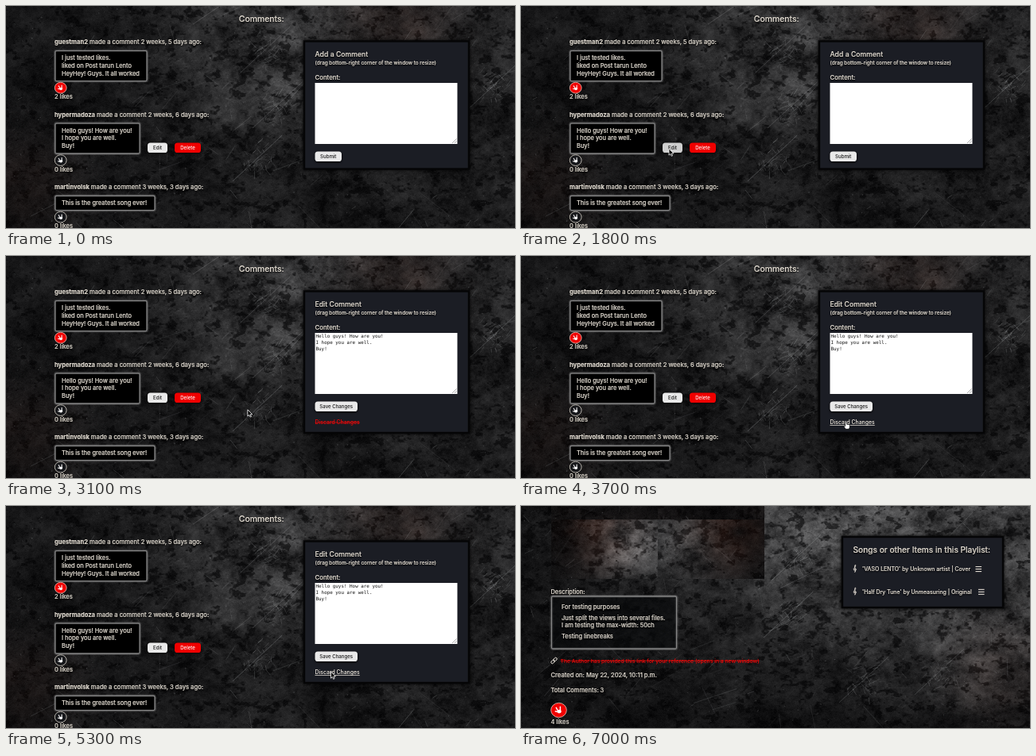
These frames come from a looping animation (640 by 280 pixels, 7.1 s). An HTML page with a canvas:

```html
<!DOCTYPE html>
<html lang="en">
<head>
<meta charset="utf-8">
<title>Comments</title>
<style>
  html, body { margin: 0; width: 100%; height: 100%; overflow: hidden; background: #16171a; }
  canvas, svg { position: absolute; left: 0; top: 0; width: 640px; height: 280px; display: block; }
  text { font-family: Inter, "Open Sans", sans-serif; font-weight: 500; fill: #f8f1e6; white-space: pre; }
  .body { stroke: #f8f1e6; stroke-width: .18px; text-shadow: 0 1px 1.5px #000; }
  .link { fill: #f00808; text-decoration: line-through .6px; }
  .link.hover { fill: #f8f1e6; text-decoration: underline .6px; }
  .mono { font-family: "DejaVu Sans Mono", monospace; font-weight: 400; fill: #111; }
  .panel { fill: #1b1d24; stroke: #050506; stroke-width: 2.4; filter: drop-shadow(0 0 2px #000); }
  .btn { filter: drop-shadow(0 1px 1.5px #000); }
  .line { fill: none; stroke: #f8f1e6; }
</style>
</head>
<body>
<canvas id="wallA" width="640" height="280"></canvas>
<canvas id="wallB" width="640" height="280"></canvas>
<svg id="stage" viewBox="0 0 640 280" xmlns="http://www.w3.org/2000/svg"></svg>
<script>
const LOOP = 7100, STEP = 100, W = 640, H = 280;
const $ = id => document.getElementById(id);

// ---------- scratched metal ----------
function random(seed) {
  return () => {
    seed = (seed + 0x6D2B79F5) | 0;
    let n = Math.imul(seed ^ seed >>> 15, 1 | seed);
    n = n + Math.imul(n ^ n >>> 7, 61 | n) ^ n;
    return ((n ^ n >>> 14) >>> 0) / 4294967296;
  };
}

function cloudNoise(seed) {
  const grid = Float32Array.from({ length: 4096 }, random(seed));
  const at = (x, y) => grid[(x & 63) + (y & 63) * 64];
  const noise = (x, y) => {
    const ix = Math.floor(x), iy = Math.floor(y);
    let u = x - ix, v = y - iy;
    u *= u * (3 - 2 * u);
    v *= v * (3 - 2 * v);
    const a = at(ix, iy), b = at(ix + 1, iy), c = at(ix, iy + 1), d = at(ix + 1, iy + 1);
    return a + (b - a) * u + (c - a + (a - b - c + d) * u) * v;
  };
  return (x, y) => noise(x, y) * .48 + noise(x * 2.1 + 7, y * 2.1) * .3 + noise(x * 4.3, y * 4.3 + 5) * .22;
}

// light(x, y) gives the brightness, rust(x, y) the warm tint, patches are worn spots
function metal(g, [x0, y0, w, h], seed, light, rust, patches = []) {
  const img = g.createImageData(w, h), px = img.data, fbm = cloudNoise(seed), rnd = random(seed + 9);
  for (let i = 0; i < w * h; i++) {
    const x = x0 + i % w, y = y0 + Math.floor(i / w);
    const cloud = fbm(x / 44, y / 34), grain = fbm(x / 5 + 20, y / 4);
    const pit = Math.max(0, fbm(x / 11 + 31, y / 8 + 17) - .56 + (grain - .5) * .3);
    const v = light(x, y) * (.2 + cloud * 1.1 + (grain - .5) * .65) * Math.max(.4, 1 - pit * 4) + (rnd() - .5) * 7;
    const warm = rust(x, y) * cloud;
    px.set([v + warm, v + warm * .25, v + 1, 255], i * 4);
  }
  g.putImageData(img, x0, y0);

  g.save();
  g.beginPath();
  g.rect(x0, y0, w, h);
  g.clip();
  const scratch = (x, y, len, turn, alpha) => {
    g.strokeStyle = `rgba(205,208,210,${alpha})`;
    g.lineWidth = .4 + rnd() * .4;
    g.beginPath();
    g.moveTo(x, y);
    g.lineTo(x + Math.cos(turn) * len, y + Math.sin(turn) * len);
    g.stroke();
  };
  const slant = () => rnd() < .6 ? -1 + rnd() * .7 : .5 + rnd() * 1.1;
  for (let i = 0; i < w * h / 900; i++)
    scratch(x0 + rnd() * w, y0 + rnd() * h, 3 + rnd() ** 4 * 60, slant(), .06 + rnd() * .2);
  for (const [x, y] of patches) {
    scratch(x - 30, y + 26, 85, -.75, .3);
    for (let i = 0; i < 60; i++)
      scratch(x + (rnd() + rnd() - 1) * 24, y + (rnd() + rnd() - 1) * 24, 2 + rnd() * 9, slant(), .1 + rnd() * .2);
  }
  for (let i = 0; i < w * h / 400; i++) {
    g.fillStyle = `rgba(190,192,194,${.05 + rnd() * .22})`;
    g.fillRect(x0 + rnd() * w, y0 + rnd() * h, .5 + rnd(), .5 + rnd());
  }
  g.restore();
}

const glow = (x, y, cx, cy, r) => Math.exp(-((x - cx) ** 2 + (y - cy) ** 2) / r ** 2);
const stage = [0, 0, W, H];

metal($("wallA").getContext("2d"), stage, 41,
  (x, y) => 26 + 38 * glow(x, y, 335, 50, 115) + 24 * x / W * (1 - y / H * .4),
  (x, y) => 16 * glow(x, y, 490, 20, 60) + 10 * glow(x, y, 20, 230, 60),
  [[325, 58], [340, 128], [610, 105], [315, 195]]);

const wallB = $("wallB").getContext("2d");
metal(wallB, stage, 77,
  (x, y) => 24 + 75 * (x / W) ** .6 * (1 - y / H) + 28 * glow(x, y, 370, 30, 90) + 20 * glow(x, y, 560, 190, 110),
  (x, y) => 10 * glow(x, y, 600, 210, 60),
  [[335, 140], [345, 68], [525, 212], [430, 222]]);
for (const [i, x] of [38, 172].entries()) {
  metal(wallB, [x, 0, 134, 17], 5 + i, () => 24, () => 4);
  metal(wallB, [x, 17, 134, 75], 15 + i,
    (px, py) => 24 + (85 - i * 20) * glow(px, py, 140 + i * 62, 46, 50),
    (px, py) => 30 * glow(px, py, 95 + i * 165, 28, 45));
}

// ---------- drawing helpers ----------
const text = (x, y, s, size = 7.45, more = "") => `<text class="body" x="${x}" y="${y}" font-size="${size}" ${more}>${s}</text>`;
const link = (x, y, s, size, id) => `<text id="${id}" class="link" x="${x}" y="${y}" font-size="${size}">${s}</text>`;
const group = (id, body) => `<g id="${id}">${body}</g>`;
const rect = (x, y, w, h, more) => `<rect x="${x}" y="${y}" width="${w}" height="${h}" ${more}/>`;

const glowBox = (x, y, w, h, fill = "#000") =>
  rect(x, y, w, h, 'rx="2" fill="none" stroke="#999" stroke-opacity=".28" stroke-width="4"') +
  rect(x, y, w, h, `rx="1.5" fill="${fill}" stroke="#858585" stroke-width="1.3"`);

const button = (x, y, w, label, fill = "#e9e9e9", ink = "#181818", id = label) =>
  rect(x, y, w, 12.5, `id="${id}" class="btn" rx="3.6" fill="${fill}"`) +
  `<text x="${x + w / 2}" y="${y + 8.4}" font-size="6.1" text-anchor="middle" style="fill:${ink}">${label}</text>`;

const like = (x, y, r, on) =>
  `<g transform="translate(${x} ${y})"><ellipse rx="${r}" ry="${r * .93}" fill="${on ? "#f00000" : "#17181b"}"
    stroke="${on ? "#e8b0a8" : "#c9c4bc"}" stroke-width=".9"/>
    <g transform="rotate(-14) scale(${r * .11})"><ellipse cx=".3" cy="1.6" rx="2.3" ry="2.1" fill="#fff"/>
    <path d="M-1 1L-2.2-3.6M1.6 1L2.6-3.4M-1 2L-4.2.4" stroke="#fff" stroke-width="1.3" stroke-linecap="round"/></g></g>`;

const comment = (y, name, age, boxW, rows, likes) => {
  const top = y + 8.5, h = rows.length * 9.9 + 8.2;
  return text(61, y, `<tspan font-weight="700">${name}</tspan> made a comment ${age} ago:`, 7.6) +
    glowBox(62, top, boxW, h) +
    rows.map((s, i) => text(70, top + 11.4 + i * 9.9, s)).join("") +
    like(68.7, top + h + 8.6, 7.4, likes > 0) +
    text(61, top + h + 22.6, likes + " likes");
};

const form = (h, title, body) =>
  rect(375, 44.5, 207, h, 'class="panel"') +
  text(388.5, 63.5, title, 8.7) +
  text(388.5, 74, "(drag bottom-right corner of the window to resize)", 6.35) +
  text(388.5, 93, "Content:", 7.8) +
  rect(388.5, 97, 179, 77, 'fill="#fff"') +
  '<path d="M561 173l5.5-5.5M564 173l2.500-2.500" stroke="#888" stroke-width=".7"/>' + body;

const song = (y, s, menuX) =>
  `<path class="line" stroke-width=".75" transform="translate(420 ${y - 3.4})"
    d="M-1 4Q.6 5 .6 3L-.4-3Q-.3-5 .7-4.6Q1.3-3-.7-1.2Q-2.6.5-1.3 2Q.5 3 1.5 1.6Q1.6 0 .2 0Q-1 .4-.5 1.4"/>` +
  text(429, y, s, 6.95) +
  `<path class="line menu" d="M${menuX} ${y - 5.8}h7.6m-7.6 3h7.6m-7.6 3h7.6"/>`;

// ---------- comments page ----------
const message = ["Hello guys! How are you!", "I hope you are well.", "Buy!"];
const pageA = text(321.3, 20, "Comments:", 10.4, 'text-anchor="middle"') +
  comment(48.2, "guestman2", "2 weeks, 5 days", 115, ["I just tested likes.", "liked on Post tarun Lento", "HeyHey! Guys. It all worked"], 2) +
  comment(139.6, "hypermadoza", "2 weeks, 6 days", 106, message, 0) +
  comment(231, "martinvolsk", "3 weeks, 3 days", 125, ["This is the greatest song ever!"], 0) +
  button(178, 172.5, 25, "Edit") +
  button(212, 172.5, 33, "Delete", "#f00000", "#fff") +
  group("addForm", form(161, "Add a Comment", button(388.5, 183.5, 33.5, "Submit"))) +
  group("editForm", form(178.5, "Edit Comment",
    message.map((s, i) => `<text class="mono" x="389.5" y="${103.2 + i * 7.9}" font-size="5.9">${s}</text>`).join("") +
    button(388.5, 183.5, 53.5, "Save Changes", undefined, undefined, "save") +
    link(388.5, 212.3, "Discard Changes", 6.9, "discard")));

// ---------- playlist page ----------
const pageB = text(37.5, 111, "Description:") +
  glowBox(38.5, 114, 157, 66, "rgba(8,9,10,.6)") +
  text(51, 130, "For testing purposes") +
  text(51, 143.7, "Just split the views into several files.") +
  text(51, 153.4, "I am testing the max-width: 50ch") +
  text(51, 166.7, "Testing linebreaks") +
  `<g transform="translate(41.5 195) rotate(-45)" class="line" stroke-width=".9">` +
  [-4.6, -.4].map(x => rect(x, -1.6, 5, 3.2, 'rx="1.6"')).join("") + "</g>" +
  link(49.5, 197.5, "The Author has provided this link for your reference (opens in a new window)", 6.8, "reference") +
  text(37.5, 216.3, "Created on: May 22, 2024, 10:11 p.m.", 7.6) +
  text(37.5, 235.3, "Total Comments: 3") +
  like(47.5, 257.5, 9.8, true) +
  text(37.5, 274.5, "4 likes") +
  rect(404, 39, 202, 89, 'class="panel"') +
  text(417.5, 58.7, "Songs or other Items in this Playlist:", 10.15) +
  song(82.4, "'VASO LENTO' by Unknown artist | Cover", 571.5) +
  song(111.1, "'Half Dry Tune' by Unmeasuring | Original", 575);

const pointer = group("pointer",
  '<path id="arrow" d="M0 0V8.2L1.9 6.5L3.2 9.3L4.6 8.7L3.3 6H5.9Z" fill="#000" stroke="#fff" stroke-width=".8"/>' +
  '<path id="hand" d="M-.3 0Q.7-.7 1.3.3V3.3Q4 3 5 4.6L4.7 7.5L3.8 9.3H-.2L-2.6 6Q-2.4 4.6-.8 5.6V.7Z" fill="#fff" stroke="#000" stroke-width=".7"/>');

$("stage").innerHTML = group("pageA", pageA) + group("pageB", pageB) + pointer;

// ---------- motion ----------
// each move: start, end, and where the pointer arrives
const moves = [[100, 800, 291, 261], [800, 1650, 186, 180], [2000, 2600, 229, 183],
  [2700, 3600, 408.5, 209], [5700, 6200, 398, 290]];

function pointerAt(t) {
  let x = 333, y = 288;
  for (const [from, to, x1, y1] of moves) {
    const u = Math.min(1, Math.max(0, (t - from) / (to - from))), e = u * u * (3 - 2 * u);
    x += (x1 - x) * e;
    y += (y1 - y) * e;
  }
  return `translate(${x.toFixed(2)} ${y.toFixed(2)})`;
}

const show = (el, on) => { el.style.display = on ? "" : "none"; };

function draw(ms) {
  const t = Math.floor(ms % LOOP / STEP) * STEP;
  const second = t >= 5400, editing = t >= 2000, over = t >= 3600, hand = over && t < 4200;
  for (const id of ["wallA", "pageA"]) show($(id), !second);
  for (const id of ["wallB", "pageB"]) show($(id), second);
  show($("addForm"), !editing);
  show($("editForm"), editing);
  show($("hand"), hand);
  show($("arrow"), !hand);
  document.querySelectorAll(".menu").forEach(m => show(m, t >= 5800));
  $("Edit").setAttribute("fill", t >= 1700 && t < 2100 ? "#cfcfcf" : "#e9e9e9");
  $("discard").classList.toggle("hover", over);
  $("pointer").setAttribute("transform", pointerAt(t));
}

const start = performance.now();
function tick() {
  draw(performance.now() - start);
  requestAnimationFrame(tick);
}
draw(0);
requestAnimationFrame(tick);
</script>
</body>
</html>
```
